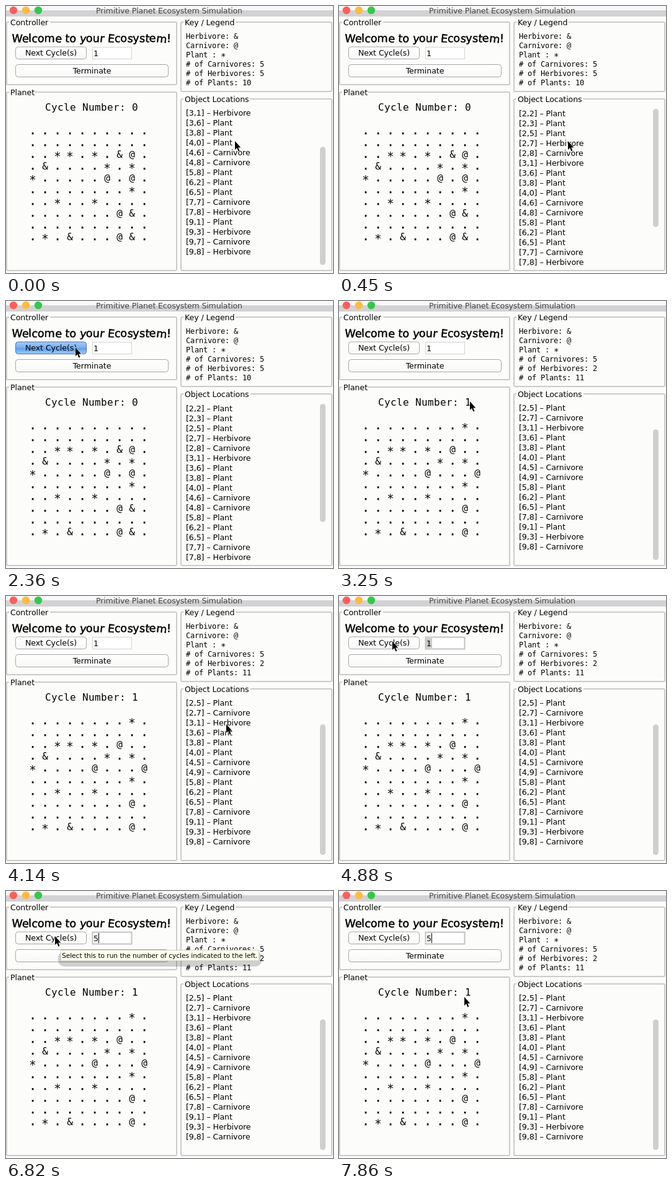
An HTML page for the animation above (8000 ms loop, 527 by 431 pixels).

```html
<!DOCTYPE html>
<html lang="en">
<head>
<meta charset="utf-8">
<title>Ecosystem Simulation</title>
<style>
  html, body { margin: 0; width: 100%; height: 100%; overflow: hidden; background: #fcfdfa; }
  svg { display: block; width: 527px; height: 431px; }
  text { font: 12.6px "DejaVu Sans", "Open Sans", sans-serif; letter-spacing: -.08px; fill: #000; }
  .mid { text-anchor: middle; }
  .mono { font: 12px "DejaVu Sans Mono", monospace; letter-spacing: -.22px; }
  .big { font: 16px "DejaVu Sans Mono", monospace; letter-spacing: .37px; }
  .cell { font: 16px "DejaVu Sans Mono", monospace; letter-spacing: 0; text-anchor: middle; }
  .dot { stroke: #000; stroke-width: .7; }
  .star { font-size: 19px; }
  .hand { font: 17.6px "DejaVu Sans", sans-serif; letter-spacing: 0; stroke: #000; stroke-width: .5; }
  .title { letter-spacing: -.17px; fill: #444; }
  .tip { font-size: 10.7px; letter-spacing: -.07px; }
  .panel { fill: none; stroke: #cbcbcb; stroke-width: 2; }
  .button { fill: url(#face); stroke: #a6a6a6; }
</style>
</head>
<body>
<svg viewBox="0 0 527 431">
  <defs>
    <linearGradient id="face" x2="0" y2="1">
      <stop stop-color="#fff"/><stop offset="1" stop-color="#f8f8f7"/>
    </linearGradient>
    <linearGradient id="blue" x2="0" y2="1">
      <stop stop-color="#a5c9f3"/><stop offset=".48" stop-color="#78aff0"/>
      <stop offset=".52" stop-color="#5b9cee"/><stop offset="1" stop-color="#9bcdfb"/>
    </linearGradient>
    <clipPath id="view"><rect x="285" y="165" width="216" height="256"/></clipPath>
  </defs>
  <rect width="527" height="431" fill="#fcfdfa"/>
  <rect width="527" height="8" fill="#f8f8f8"/>
  <rect y="7" width="527" height="10" fill="#d2d1d4"/>
  <circle cx="12" cy="7" r="6.2" fill="#fc605b"/>
  <circle cx="32" cy="7" r="6.2" fill="#fdbc40"/>
  <circle cx="52" cy="7" r="6.2" fill="#34c84a"/>
  <text class="title" x="145" y="12">Primitive Planet Ecosystem Simulation</text>
  <g id="panels"></g>

  <text id="welcome" class="hand" x="9" y="58">Welcome to your Ecosystem!</text>
  <rect id="next" class="button" x="15.5" y="66" width="114" height="19.5" rx="4"/>
  <text class="mid" x="72.5" y="80">Next Cycle(s)</text>
  <rect class="button" x="15.5" y="94.5" width="246" height="20" rx="4"/>
  <text class="mid" x="138.5" y="108.5">Terminate</text>
  <rect id="field" x="139.5" y="66.5" width="63" height="19" fill="#fff"/>
  <rect id="selection" x="140" y="68" width="10" height="16" fill="#c9c9c9"/>
  <text id="entry" x="141" y="81"></text>
  <rect id="caret" x="149" y="68" width="1" height="16"/>

  <text class="mono" x="290" y="53">Herbivore: &amp;</text>
  <text class="mono" x="290" y="68">Carnivore: @</text>
  <text class="mono" x="290" y="83">Plant : <tspan dy="3" font-size="14">*</tspan></text>
  <g id="worlds"></g>
  <rect id="thumb" x="506" width="9" rx="4.5" fill="#cfcfcf"/>

  <g id="tooltip">
    <rect x="84" y="97" width="328" height="25" rx="10" opacity=".18"/>
    <rect x="88.5" y="95.5" width="319" height="17" fill="#fdfdee" stroke="#cfcfc4"/>
    <text class="tip" x="90" y="108">Select this to run the number of cycles indicated to the left.</text>
  </g>
  <path id="cursor" d="M0-1V13L3.1 10.1L5.4 15.5L7.4 14.6L5.2 9.4H9.3Z" stroke="#fff" stroke-width="1.2" paint-order="stroke"/>
</svg>
<script>
const LOOP = 8000, STEP = 145, BLINK = 520;
const $ = id => document.getElementById(id);

function set(node, attrs) {
  for (const key in attrs) node.setAttribute(key, attrs[key]);
}
const show = (node, on) => set(node, { display: on ? "inline" : "none" });

function add(parent, tag, attrs, content = "") {
  const node = document.createElementNS("http://www.w3.org/2000/svg", tag);
  set(node, attrs);
  node.textContent = content;
  return parent.appendChild(node);
}

function addPanel(label, x, y, w, h, gap) {
  add($("panels"), "rect", { class: "panel", x: x + 1, y, width: w - 2, height: h, rx: 2 });
  add($("panels"), "rect", { x: x + 5, y: y - 3, width: gap, height: 7, fill: "#fcfdfa" });
  add($("panels"), "text", { x: x + 7, y: y + 5 }, label);
}
addPanel("Controller", 0, 26, 276, 101, 66);
addPanel("Planet", 0, 139, 276, 288, 42);
addPanel("Key / Legend", 281, 26, 245, 112, 84);
addPanel("Object Locations", 281, 150, 245, 277, 108);

// Uneven tilt for the handwritten heading
const tilts = [...$("welcome").textContent].map((_, i) => 3 + 4 * Math.sin(i * 2.4));
set($("welcome"), { rotate: tilts.join(" ") });

const KINDS = { "@": "Carnivore", "&": "Herbivore", "*": "Plant" };

function addWorld(cycle, rows) {
  const group = add($("worlds"), "g", {});
  const counts = { "@": 0, "&": 0, "*": 0 };
  const view = add(group, "g", { "clip-path": "url(#view)" });
  const list = add(view, "g", {});
  let items = 0;
  add(group, "text", { class: "big", x: 63, y: 169 }, "Cycle Number: " + cycle);
  rows.forEach((row, r) => [...row].forEach((mark, c) => {
    const look = { ".": "dot", "*": "star" }[mark] || "";
    const y = 207 + 19 * r + (mark === "*" ? 4 : 0);
    add(group, "text", { class: "cell " + look, x: 43 + 20 * c, y }, mark);
    if (mark === ".") return;
    counts[mark]++;
    add(list, "text", { x: 290, y: 178 + 16 * items++ }, `[${r},${c}] – ${KINDS[mark]}`);
  }));
  Object.keys(counts).forEach((mark, i) =>
    add(group, "text", { class: "mono", x: 290, y: 98 + 15 * i }, `# of ${KINDS[mark]}s: ${counts[mark]}`));
  return { group, list, maxScroll: items * 16 - 239, thumb: 252 * 256 / (items * 16 + 18) };
}

// Carnivores eat the herbivore beside them, or move apart
const hunt = row => row.replace("&@", "@.").replace("@&", ".@").replace(".@.@.", "@...@");

const planet = `
..........
..........
..**.*.&@.
.&....*.*.
*.....@.@.
........*.
..*..*....
.......@&.
..........
.*.&...@&.`.trim().split("\n");
const nextPlanet = planet.map(hunt);
nextPlanet[0] = "........*.";
const worlds = [addWorld(0, planet), addWorld(1, nextPlanet)];

// Pointer strokes: start, end, target and an optional bend
const strokes = [
  { start: 1050, end: 2220, to: [112, 76], bend: [140, 22] },
  { start: 2960, end: 3250, to: [211, 163] },
  { start: 3400, end: 3400, to: [210, 174] },
  { start: 3700, end: 3850, to: [384, 231] },
  { start: 4000, end: 4730, to: [139, 74], bend: [180, 66] },
  { start: 4880, end: 4880, to: [86, 74] },
  { start: 5770, end: 6070, to: [79, 74] },
  { start: 7260, end: 7860, to: [202, 172], bend: [165, 225] },
];

function pointerAt(t) {
  let at = [369, 219];
  for (const { start, end, to, bend } of strokes) {
    if (t < start) break;
    const steps = Math.round((end - start) / STEP) + 1;
    const p = Math.min(1, (Math.floor((t - start) / STEP) + 1) / steps);
    const e = p * p * (3 - 2 * p);
    const via = bend || at.map((v, i) => (v + to[i]) / 2);
    at = at.map((v, i) => v * (1 - e) ** 2 + 2 * via[i] * e * (1 - e) + to[i] * e * e);
  }
  return at;
}

const within = (t, from, to) => t >= from && t < to;

function render(t) {
  const [x, y] = pointerAt(t).map(Math.round);
  set($("cursor"), { transform: `translate(${x} ${y})` });

  const current = t < 2510 ? 0 : 1;
  const { list, maxScroll, thumb } = worlds[current];
  const part = t < 300 ? 1 : t < 450 ? .5 : current;
  worlds.forEach((world, i) => show(world.group, i === current));
  set(list, { transform: `translate(0 ${-maxScroll * part})` });
  set($("thumb"), { y: 166 + (252 - thumb) * part, height: thumb });

  const pressed = within(t, 2360, 2510);
  $("next").style.fill = pressed ? "url(#blue)" : "";
  $("next").style.stroke = pressed ? "#5873a5" : "";

  const focused = t >= 4440, selected = within(t, 4880, 6070);
  const blinkOn = Math.floor((t - 6820) / BLINK) % 2 === 0;
  set($("field"), { stroke: focused ? "#c2c2c2" : "#d3d3d3", "stroke-width": focused ? 2 : 1 });
  show($("selection"), selected);
  show($("caret"), focused && !selected && blinkOn);
  $("entry").textContent = t < 6070 ? "1" : "5";
  show($("tooltip"), within(t, 5770, 7260));
}

function tick() {
  render(performance.now() % LOOP);
  requestAnimationFrame(tick);
}
tick();
</script>
</body>
</html>
```
